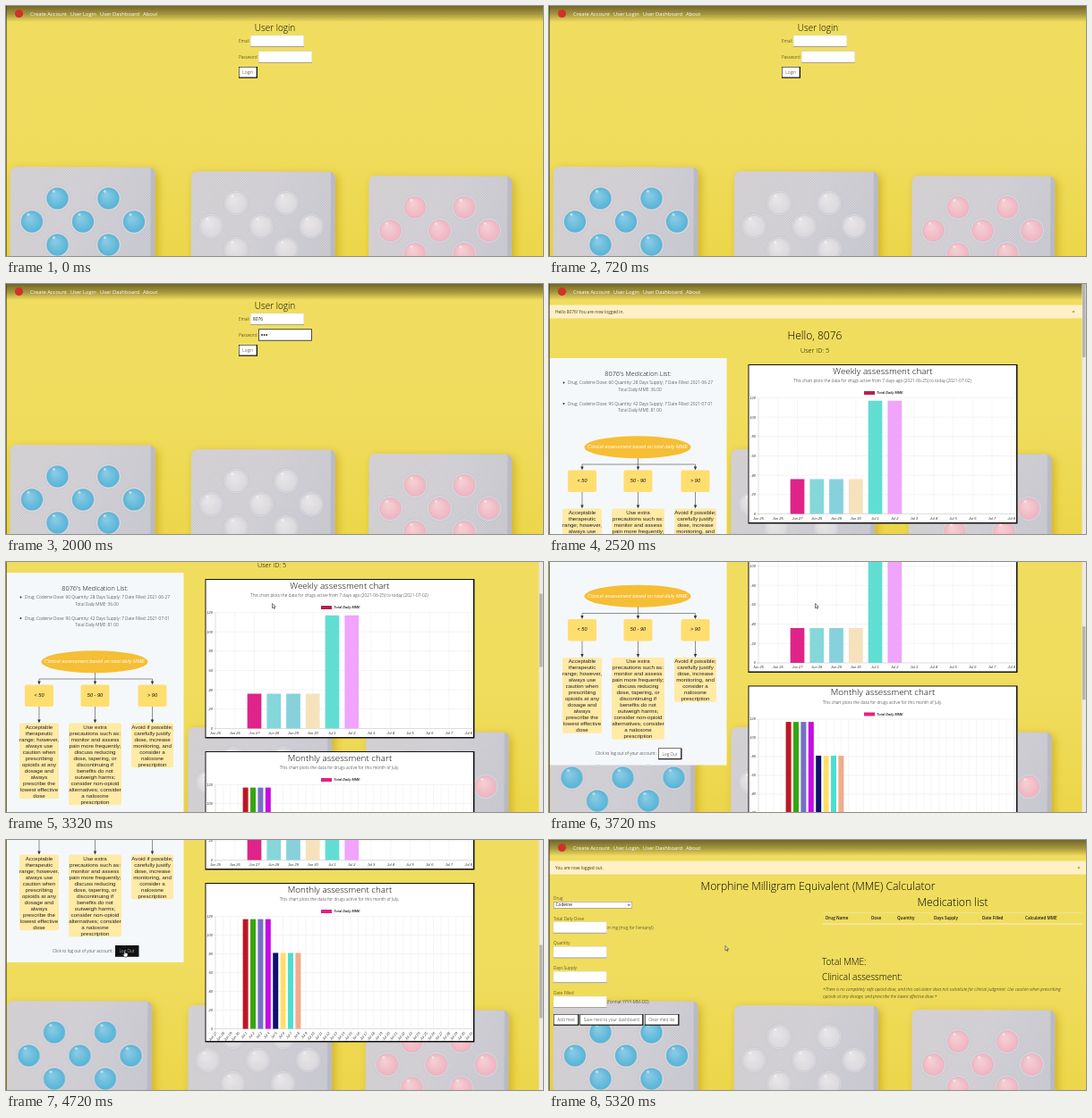
Write an HTML page with a canvas that moves like this. It is 600 px wide and 280 px high and loops after 5.4 s.

```html
<!DOCTYPE html>
<html lang="en">
<head>
<meta charset="utf-8">
<title>Medication dashboard walkthrough</title>
<style>
html, body { margin: 0; width: 100%; height: 100%; overflow: hidden; background: #f0dd5d; }
canvas { display: block; }
</style>
</head>
<body>
<canvas id="stage" width="600" height="280"></canvas>
<script>
const W = 600, H = 280, LOOP = 5400;
const USER = '8076';
const PAGE_FONT = '"Open Sans", sans-serif';
const ARIAL = '"Liberation Sans", sans-serif';
const stage = document.getElementById('stage').getContext('2d');
let ctx = stage;

// ---------- drawing helpers ----------
function text(str, x, y, o = {}) {
  const { size = 4.8, color = '#1a1a1a', weight = 300, align = 'left', style = 'normal', family = PAGE_FONT } = o;
  ctx.font = `${style} ${weight} ${size}px ${family}`;
  ctx.fillStyle = color;
  ctx.textAlign = align;
  ctx.fillText(str, x, y + size * 0.34);
}

const centered = (str, x, y, o) => text(str, x, y, { align: 'center', ...o });
const heading = (str, x, y, size, align = 'center') => text(str, x, y + 0.6, { size, align, color: '#000' });

function rect(x, y, w, h, fill) {
  ctx.fillStyle = fill;
  ctx.fillRect(x, y, w, h);
}

function rounded(x, y, w, h, r, fill) {
  ctx.beginPath();
  ctx.roundRect(x, y, w, h, r);
  ctx.fillStyle = fill;
  ctx.fill();
}

function disc(x, y, r, fill) {
  ctx.beginPath();
  ctx.arc(x, y, r, 0, 7);
  ctx.fillStyle = fill;
  ctx.fill();
}

function line(points, color, width = 0.6) {
  ctx.beginPath();
  points.forEach(([x, y]) => ctx.lineTo(x, y));
  ctx.strokeStyle = color;
  ctx.lineWidth = width;
  ctx.stroke();
}

function polygon(points, fill, stroke) {
  ctx.beginPath();
  points.forEach(([x, y]) => ctx.lineTo(x, y));
  ctx.closePath();
  ctx.fillStyle = fill;
  ctx.fill();
  if (stroke) {
    ctx.strokeStyle = stroke;
    ctx.lineWidth = 0.6;
    ctx.stroke();
  }
}

function gradient(shape, ...colors) {
  const g = shape.length === 4 ? ctx.createLinearGradient(...shape) : ctx.createRadialGradient(...shape);
  colors.forEach((color, i) => g.addColorStop(i / (colors.length - 1), color));
  return g;
}

// Piecewise linear interpolation through [time, ...values] keys
function track(keys, t) {
  if (t <= keys[0][0]) return keys[0].slice(1);
  for (let i = 1; i < keys.length; i++) {
    const [a, b] = [keys[i - 1], keys[i]];
    if (t < b[0]) {
      const k = (t - a[0]) / (b[0] - a[0]);
      return b.slice(1).map((v, j) => a[j + 1] + (v - a[j + 1]) * k);
    }
  }
  return keys.at(-1).slice(1);
}

// ---------- background with blister packs ----------
// Pills sit on a hexagonal grid around the centre pill, in units of the gap and row height
const PILL_GRID = [[-0.5, -1], [0.5, -1], [-1, 0], [0, 0], [1, 0], [-0.5, 1], [0.5, 1]];
const PACKS = [
  { x: 4.8, y: 180, w: 162, cx: 86, cy: 241.5, gap: 57, light: '#86c9e4', base: '#55b3d6' },
  { x: 207, y: 185, w: 161, cx: 285, cy: 246.5, gap: 56, light: '#e6e4e6', base: '#dad8da' },
  { x: 405.5, y: 190, w: 160, cx: 484.5, cy: 251.5, gap: 55, light: '#f4cdd3', base: '#efb3bf' }
];

function drawPack({ x, y, w, cx, cy, gap, light, base }) {
  ctx.save();
  ctx.translate(x, y);
  ctx.rotate(0.004);
  ctx.shadowColor = 'rgba(190,150,0,.6)';
  ctx.shadowBlur = 10;
  ctx.shadowOffsetX = 3;
  ctx.shadowOffsetY = 3;
  rounded(0, 0, w, 130, 7, gradient([0, 0, w, 60], '#d2ced0', '#d0ced3', '#c6c6ce'));
  ctx.shadowColor = 'transparent';
  ctx.clip();
  for (let i = -130; i < 165; i += 2.8) {
    line([[i, 0], [i + 130, 130]], 'rgba(255,255,255,.28)', 0.8);
    line([[i, 130], [i + 130, 0]], 'rgba(150,148,156,.18)', 0.7);
  }
  rect(w - 5, 0, 5, 130, 'rgba(150,150,162,.3)');
  ctx.restore();

  for (const [col, row] of PILL_GRID) {
    const px = cx + col * gap, py = cy + row * 26;
    disc(px, py, 15, gradient([px, py, 11, px, py, 15], 'rgba(165,165,176,.55)', 'rgba(222,222,230,.7)', 'rgba(185,185,195,.25)'));
    disc(px, py, 12, gradient([px - 3, py - 4, 2, px, py, 12.5], light, base));
    disc(px - 4, py - 8, 1.6, 'rgba(255,255,255,.5)');
  }
}

function makeBackground() {
  const canvas = document.createElement('canvas');
  canvas.width = W + 4;
  canvas.height = H;
  ctx = canvas.getContext('2d');
  rect(0, 0, W + 4, H, gradient([0, 0, 0, H], '#f0dd5f', '#f0dd5e', '#ecd64a'));
  PACKS.forEach(drawPack);
  ctx = stage;
  return canvas;
}
const background = makeBackground();

// ---------- shared page parts ----------
function navbar() {
  rect(0, 0, W, 18, gradient([0, 0, 0, 18], 'rgba(50,42,10,.66)', 'rgba(50,42,10,.4)', 'rgba(50,42,10,0)'));
  disc(14.5, 8.5, 4.6, '#d3302a');
  const links = { 'Create Account': 27, 'User Login': 72, 'User Dashboard': 105, 'About': 153 };
  for (const [label, x] of Object.entries(links)) text(label, x, 9, { size: 5.8, color: '#fff', weight: 400 });
}

function banner(message, closeX) {
  rect(0, 23.5, W, 15, '#fff0c6');
  text(message, 7, 31, { color: '#4d3b05', weight: 400 });
  centered('×', closeX, 31, { size: 6, color: '#6b5a20', weight: 400 });
}

function input(x, y, focused = false) {
  rect(x, y, 60, 13.2, focused ? '#1c2233' : '#d8d2b4');
  const edge = focused ? 0.8 : 0.5;
  rect(x + edge, y + edge, 60 - 2 * edge, 13.2 - 2 * edge, '#fff');
  if (!focused) rect(x, y + 12.5, 60, 0.7, '#8a8a7c');
}

function button(label, x, y, w, pressed = false) {
  rect(x, y, w, 12.8, '#111');
  rect(x + 0.6, y + 0.6, w - 1.9, 11, pressed ? '#111' : '#fff');
  centered(label, x + w / 2 - 0.3, y + 6.5, { color: pressed ? '#fff' : '#222' });
}

function arrowCursor(x, y) {
  polygon([[0, 0], [0, 5.2], [1.2, 4.1], [2.1, 6], [2.9, 5.6], [2.1, 3.8], [3.7, 3.7]]
    .map(([dx, dy]) => [x + dx, y + dy]), '#fff', '#222');
}

function handCursor(x, y) {
  polygon([[0, 0], [1, 0], [1, 2.4], [4, 3], [4, 5.2], [3.2, 7], [0.4, 7], [-1.6, 4.2], [-1, 3.7], [0, 4.4]]
    .map(([dx, dy]) => [x + dx, y + dy]), '#fff', '#222');
}

// ---------- login page ----------
const TYPE_TIMES = [1200, 1320, 1520, 1600];
const PASSWORD_TIMES = [1800, 1920, 2000, 2120];
const countPast = (times, t) => times.filter(at => t >= at).length;

function loginPage(t) {
  const typed = countPast(TYPE_TIMES, t);
  const dots = countPast(PASSWORD_TIMES, t);
  const onEmail = t >= 1000 && t < 1720;
  navbar();
  heading('User login', 300.5, 24, 10);
  text('Email', 260, 39);
  input(273, 32.6, onEmail);
  text('Password', 260, 57);
  input(282, 50.4, t >= 1720);
  button('Login', 260, 68, 21);
  text(USER.slice(0, typed), 276, 39.3, { weight: 400 });
  for (let i = 0; i < dots; i++) disc(286 + i * 2.6, 57, 0.9, '#222');
  if (onEmail) rect(276 + typed * 2.75, 36.5, 0.6, 5.5, '#222');
  if (onEmail && typed > 0 && typed < 4) {
    ctx.shadowColor = 'rgba(0,0,0,.3)';
    ctx.shadowBlur = 2;
    rounded(273, 46, 75, 34.5, 1, '#fff');
    ctx.shadowBlur = 0;
    const item = { size: 4.8, weight: 400, family: ARIAL, color: '#111' };
    text(USER, 278, 56.3, item);
    text(USER.slice(0, 3), 278, 70.5, item);
  }
}

// ---------- dashboard ----------
function medicationItem(y, dose, quantity, date, mme) {
  disc(16.5, y, 0.9, '#222');
  text(`Drug: Codeine Dose: ${dose} Quantity: ${quantity} Days Supply: 7 Date Filled: ${date}`, 21, y);
  centered(`Total Daily MME: ${mme}`, 101.5, y + 7.5);
}

function arrow(x, y1, y2) {
  line([[x, y1], [x, y2 - 2]], '#444');
  polygon([[x - 1.7, y2 - 4], [x + 1.7, y2 - 4], [x, y2]], '#333');
}

const ADVICE = [
  { x: 37, range: '< 50', w: 44, lines: ['Acceptable', 'therapeutic', 'range; however,', 'always use', 'caution when',
    'prescribing', 'opioids at any', 'dosage and', 'always', 'prescribe the', 'lowest effective', 'dose'] },
  { x: 99.5, range: '50 - 90', w: 59, lines: ['Use extra', 'precautions such as:', 'monitor and assess', 'pain more frequently;',
    'discuss reducing', 'dose, tapering, or', 'discontinuing if', 'benefits do not', 'outweigh harms;',
    'consider non-opioid', 'alternatives; consider', 'a naloxone', 'prescription'] },
  { x: 163.5, range: '> 90', w: 47, lines: ['Avoid if possible;', 'carefully justify', 'dose, increase', 'monitoring, and',
    'consider a', 'naloxone', 'prescription'] }
];

function flowchart() {
  ctx.beginPath();
  ctx.ellipse(99, 182.7, 59.5, 12.5, 0, 0, 7);
  ctx.fillStyle = '#f6be34';
  ctx.fill();
  centered('Clinical assessment based on total daily MME', 99, 182.5, { size: 5.5, style: 'italic', weight: 400, family: ARIAL, color: '#fff' });
  line([[99.5, 195], [99.5, 202]], '#444');
  line([[37, 202], [163.5, 202]], '#444');
  for (const { x, range, w, lines } of ADVICE) {
    arrow(x, 202, 208.5);
    rounded(x - 16, 208.5, 32, 24.5, 2, '#ffde70');
    centered(range, x, 220, { size: 5.6, style: 'italic', weight: 400, family: ARIAL, color: '#111' });
    arrow(x, 233, 251.5);
    rounded(x - w / 2, 251.5, w, lines.length * 7 + 0.8, 2, '#ffeaa6');
    lines.forEach((row, i) => centered(row, x, 255.5 + i * 7, { size: 6.2, weight: 400, family: ARIAL, color: '#222' }));
  }
}

function dayLabel(day) {
  return day <= 30 ? `Jun ${day}` : `Jul ${day - 30}`;
}

// Days count on from June, so day 31 is July 1
function chart(top, o) {
  const { title, note, legend, firstDay, days, step, barWidth, bars, axisHeight, slanted } = o;
  const left = 234, zero = top + 37.5 + axisHeight;
  const label = { size: 4, style: 'italic', weight: 400, family: ARIAL, color: '#333' };
  rect(222.5, top, 301, 178.5, '#111');
  rect(223.5, top + 1, 298.5, 176, '#fff');
  heading(title, 373, top + 6.7, 9.9);
  centered(note, 372.5, top + 18.7);
  rect(352, top + 30, 12, 4, legend);
  text('Total Daily MME', 366, top + 32, { ...label, size: 3.9, weight: 700 });
  for (let value = 0; value <= 120; value += 20) {
    const y = zero - value / 120 * axisHeight;
    line([[232, y], [521, y]], value ? '#e8e8e8' : '#bbb', 0.5);
    text(value, 231, y, { ...label, align: 'right' });
  }
  for (let i = 0; i < days; i++) {
    const x = left + i * step;
    line([[x, top + 37.5], [x, zero + 2]], i ? '#ececec' : '#bbb', 0.5);
    if (slanted) {
      ctx.save();
      ctx.translate(x + 1, zero + 4);
      ctx.rotate(-0.87);
      text(dayLabel(firstDay + i), 0, 0, { ...label, align: 'right' });
      ctx.restore();
    } else {
      centered(dayLabel(firstDay + i), x, zero + 5, label);
    }
  }
  bars.forEach(([day, value, color]) => {
    const h = value / 120 * axisHeight;
    rect(left + (day - firstDay) * step - barWidth / 2, zero - h, barWidth, h, color);
  });
}

const WEEKLY = {
  title: 'Weekly assessment chart',
  note: 'This chart plots the data for drugs active from 7 days ago (2021-06-25) to today (2021-07-02)',
  legend: '#b8204c', firstDay: 25, days: 14, step: 21.75, barWidth: 15.7, axisHeight: 130,
  bars: [[27, 36, '#de2488'], [28, 36, '#86d7da'], [29, 36, '#87d1dc'], [30, 36, '#f5e2bd'], [31, 117, '#62ddd2'], [32, 117, '#f0a4fb']]
};
const MONTHLY = {
  title: 'Monthly assessment chart',
  note: 'This chart plots the data for drugs active for this month of July.',
  legend: '#e5207f', firstDay: 27, days: 35, step: 8.4, barWidth: 6, axisHeight: 126, slanted: true,
  bars: [[31, 117, '#bd1626'], [32, 117, '#37a510'], [33, 117, '#7470c6'], [34, 117, '#c60be4'],
    [35, 81, '#10106e'], [36, 81, '#ffdf66'], [37, 81, '#4bdfd0'], [38, 81, '#f2ac8c']]
};

function dashboardPage(t) {
  const [scroll] = track([[3120, 0], [3320, 71], [4000, 196], [4400, 235]], t);
  ctx.save();
  ctx.translate(0, -scroll);
  navbar();
  banner(`Hello ${USER}! You are now logged in.`, 586);
  heading(`Hello, ${USER}`, 297, 57, 12);
  heading('User ID: 5', 297, 73.5, 7.3);
  rect(1, 83, 197.5, 289, '#f5f8fa');
  heading(`${USER}'s Medication List:`, 99.5, 99.7, 7.3);
  medicationItem(110.5, 60, 28, '2021-06-27', '36.00');
  medicationItem(134, 90, 42, '2021-07-01', '81.00');
  flowchart();
  text('Click to log out of your account:', 52, 359, { color: '#111' });
  button('Log Out', 122, 353, 26.5, t >= 4600);
  chart(90, WEEKLY);
  chart(283, MONTHLY);
  ctx.restore();
  rect(595.5, 0, 4.5, H, '#e9e9e9');
  rect(596, scroll / 2, 3.5, 82, '#b5b5b5');
  if (t >= 4520) handCursor(132, 124);
  else if (t >= 2800) arrowCursor(...track([[2800, 285, 70], [3120, 297.5, 46.5], [4200, 297.5, 46.5], [4520, 132, 124]], t));
}

// ---------- calculator page ----------
function calculatorPage(t) {
  navbar();
  banner('You are now logged out.', 592);
  heading('Morphine Milligram Equivalent (MME) Calculator', 300.5, 51.5, 12.2);
  heading('Medication list', 451, 69, 12.2);

  text('Drug', 5, 65.5);
  rect(5, 69, 88, 7.5, '#777');
  rect(5.5, 69.5, 87, 6.5, '#fff');
  text('Codeine', 7.5, 72.8, { weight: 400 });
  line([[88, 72], [89.3, 73.5], [90.6, 72]], '#222', 0.8);

  const fields = { 'Total Daily Dose': 'in mg (mcg for Fentanyl)', 'Quantity': '', 'Days Supply': '', 'Date Filled': '(format YYYY-MM-DD)' };
  Object.entries(fields).forEach(([label, hint], i) => {
    const y = 88 + i * 27.8;
    text(label, 5, y);
    input(4.7, y + 3.3);
    text(hint, 65, y + 10);
  });
  button('Add med', 5, 195, 28.5);
  button('Save med to your dashboard', 34.5, 195, 71);
  button('Clear med list', 107, 195, 38.5);

  const columns = { 'Drug Name': 309, 'Dose': 360, 'Quantity': 389, 'Days Supply': 430, 'Date Filled': 484, 'Calculated MME': 532 };
  for (const [name, x] of Object.entries(columns)) text(name, x, 87, { weight: 600, size: 4.6 });
  line([[306, 81.5], [596, 81.5]], 'rgba(235,230,200,.8)');
  line([[306, 94], [596, 94]], 'rgba(245,240,215,.95)', 1);
  heading('Total MME:', 305, 135.7, 10.1, 'left');
  heading('Clinical assessment:', 305, 153, 10.1, 'left');
  const note = { style: 'italic' };
  text('*There is no completely safe opioid dose, and this calculator does not substitute for clinical judgment. Use caution when prescribing', 306, 167.7, note);
  text('opioids at any dosage, and prescribe the lowest effective dose.*', 306, 175.2, note);
  arrowCursor(...track([[4800, 132, 124], [5120, 197, 118.5]], t));
}

// ---------- timeline ----------
function draw(now) {
  const time = now % LOOP;
  const t = time - time % 200 + (time % 200 >= 120 ? 120 : 0);
  const onDashboard = t >= 2200 && t < 4800;
  ctx.drawImage(background, onDashboard ? -3.5 : 0, 0);
  if (onDashboard) dashboardPage(t);
  else if (t < 2200) loginPage(t);
  else calculatorPage(t);
  rect(0, 0, 0.8, H, 'rgba(60,50,15,.75)');
}

function tick() {
  draw(performance.now());
  requestAnimationFrame(tick);
}
tick();
</script>
</body>
</html>
```
